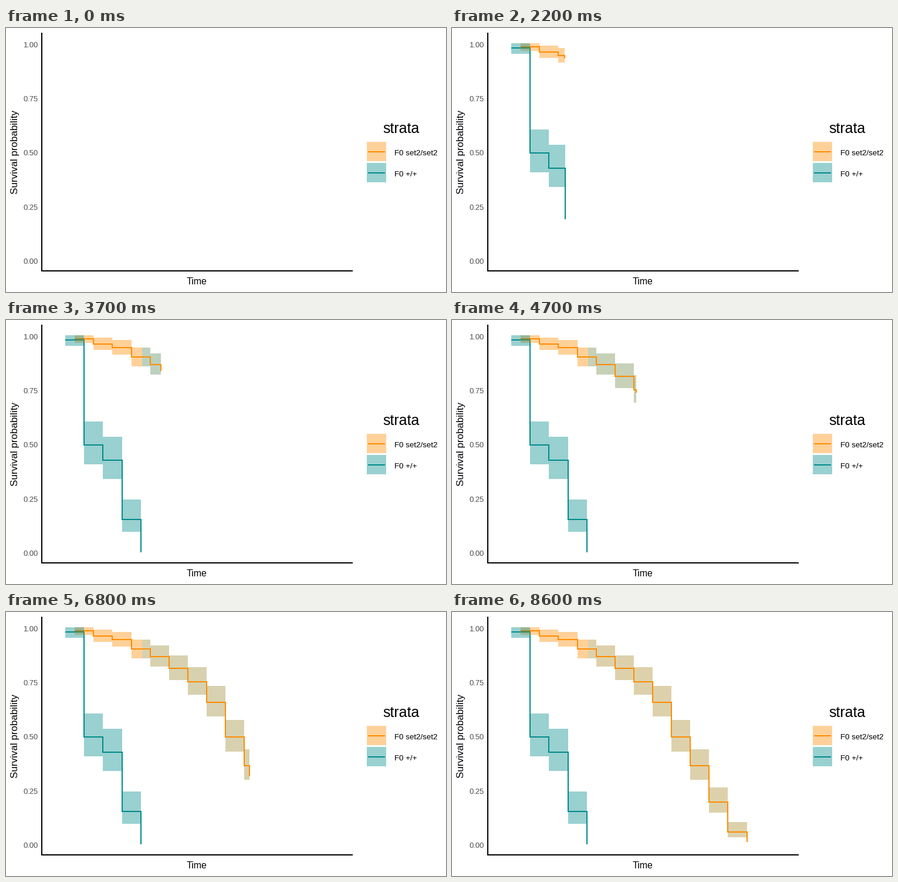
A matplotlib script for the animation above (10000 ms loop, 750x450 px).

```python
import math

import matplotlib.pyplot as plt
import numpy as np
from matplotlib.animation import FuncAnimation
from matplotlib.collections import PolyCollection
from matplotlib.patches import Rectangle

WIDTH, HEIGHT, DPI = 750, 450, 100
FRAMES, INTERVAL = 100, 100
MAX_TIME = 15
ALPHA = 0.4
ORANGE, TEAL = "#FF8C00", "#008B8B"
PALE_ORANGE = np.array([255, 209, 153]) / 255
PALE_TEAL = np.array([153, 209, 209]) / 255
TEAL_END = 30  # frame in which the short curve is complete

plt.rcParams["font.family"] = "Liberation Sans"
fig = plt.figure(figsize=(WIDTH / DPI, HEIGHT / DPI), dpi=DPI, facecolor="white")
ax = fig.add_axes([0, 0, 1, 1])
ax.set(xlim=(0, WIDTH), ylim=(HEIGHT, 0))
ax.axis("off")


def time_to_x(t):
    return 85.15 + 32.105 * t


def label(x, y, text, size, color="black", **kw):
    ax.text(x, y, text, fontsize=size * 72 / DPI, color=color,
            **{"va": "baseline", **kw})


def stroke(xs, ys, color, **kw):
    return ax.plot(xs, ys, color=color, lw=2 * 72 / DPI, antialiased=False,
                   solid_capstyle="butt", solid_joinstyle="miter", **kw)[0]


class Curve:
    """Step curve with a confidence band, revealed along time."""

    def __init__(self, color, start, ys, upper, lower):
        self.ys, self.upper, self.lower = ys, upper, lower
        times = start + np.arange(len(ys))
        self.xs = time_to_x(times)
        self.keys = [round(t * (FRAMES - 1) / MAX_TIME) for t in times]
        self.line = stroke([], [], color, drawstyle="steps-post", zorder=2)
        self.band = PolyCollection([], facecolors=color, alpha=ALPHA, lw=0,
                                   antialiased=False, zorder=3)
        ax.add_collection(self.band)

    def revealed(self, frame):
        count = sum(key <= frame for key in self.keys)
        xs, ys = list(self.xs[:count]), list(self.ys[:count])
        if 0 < count < len(self.keys):
            xs.append(np.interp(frame, self.keys, self.xs))
            ys.append(np.interp(frame, self.keys, self.ys))
        return [math.floor(x + 0.5) for x in xs], ys

    def boxes(self, xs, left=0, right=WIDTH):
        result = []
        for x0, x1, top, bottom in zip(xs, xs[1:], self.upper, self.lower):
            x0, x1 = max(x0, left), min(x1, right)
            if x1 > x0:
                result.append([(x0, top), (x1, top), (x1, bottom), (x0, bottom)])
        return result


def area(boxes):
    return sum((b[1][0] - b[0][0]) * (b[2][1] - b[1][1]) for b in boxes)


# Axes
stroke([61, 61], [8, 415], "black")
stroke([60, 591], [414, 414], "black")
for i, y in enumerate((33, 125, 217, 310, 402)):
    label(54.5, y, f"{1 - i / 4:.2f}", 13, "#4D4D4D", ha="right")
label(325.5, 437, "Time", 16, ha="center")
label(23, 211.5, "Survival probability", 17, rotation=90, ha="right",
      va="center")

# Legend
label(673.5, 179, "strata", 25, ha="center")
for top, color, name in ((194, ORANGE, "F0 set2/set2"), (230, TEAL, "F0 +/+")):
    ax.add_patch(Rectangle((615, top), 33, 33, fc=color, alpha=ALPHA, lw=0,
                           antialiased=False))
    stroke([617, 646], [top + 17] * 2, color)
    label(662, top + 23, name, 13.33)

mutant = Curve(
    ORANGE, 1.0,
    [32, 41, 47, 63, 76, 96, 119, 154, 213, 262, 324, 375, 392],
    [26, 30, 34, 47, 57, 74, 94, 126, 184, 234, 299, 358],
    [39, 51, 59, 79, 93, 116, 141, 178, 238, 286, 342, 384])
wild = Curve(TEAL, 0.5, [34, 213, 239, 340, 396],
             [26, 173, 199, 306], [44, 246, 271, 361])
tinted = PolyCollection([], lw=0, antialiased=False, zorder=1)
ax.add_collection(tinted)
split = mutant.revealed(TEAL_END)[0][-1]


def update(frame):
    shown = {}
    for curve in (mutant, wild):
        xs, ys = curve.revealed(frame)
        curve.line.set_data(xs, ys)
        curve.band.set_verts(curve.boxes(xs, right=split))
        shown[curve] = xs

    # The late band takes the mean tint of both bands, weighted by area.
    late = mutant.boxes(shown[mutant], left=split)
    tinted.set_verts(late)
    if late:
        orange = area(mutant.boxes(shown[mutant]))
        share = orange / (orange + area(wild.boxes(shown[wild])))
        tinted.set_facecolor(share * PALE_ORANGE + (1 - share) * PALE_TEAL)
    return mutant.line, wild.line, mutant.band, wild.band, tinted


def init():
    return update(0)


anim = FuncAnimation(fig, update, frames=FRAMES, init_func=init,
                     interval=INTERVAL, repeat=True, repeat_delay=0)
plt.show()
```
